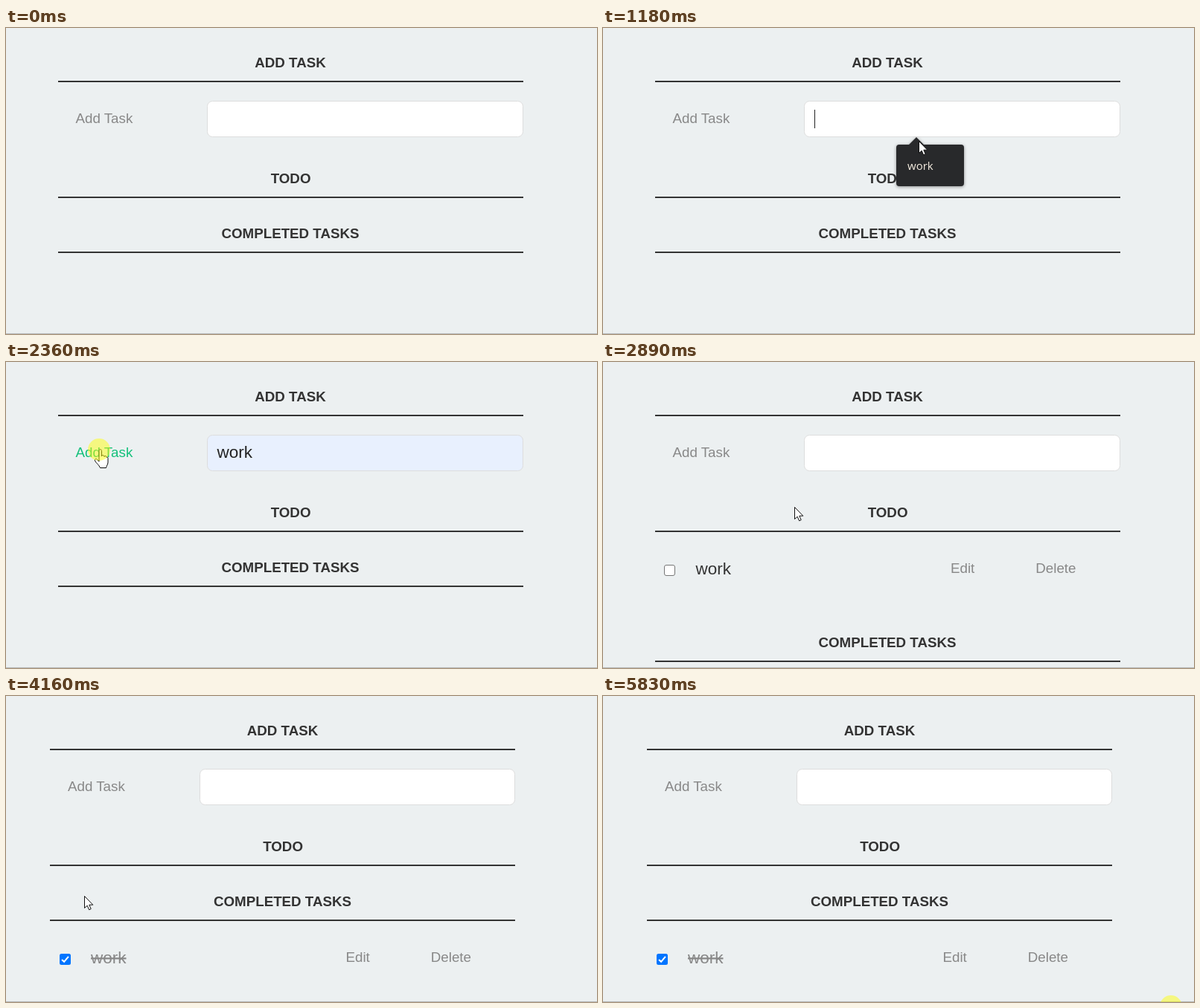
Animation, 794 px wide and 412 px high, one loop 5.9 s. Source, as an HTML page:

```html
<!DOCTYPE html>
<html lang="en">
<head>
<meta charset="utf-8">
<title>Todo list</title>
<style>
  html, body { margin: 0; width: 100%; height: 100%; overflow: hidden; background: #ecf0f1; }
  svg { display: block; width: 794px; height: 412px; font: 18.75px "Liberation Sans", Arial, sans-serif; }
  text { white-space: pre; }
  .heads { font-weight: 700; fill: #333; text-anchor: middle; }
  .rules { fill: #333; }
  .link { fill: #888; }
  .link.hover { fill: #12c07a; }
  .big { font-size: 22.5px; fill: #222; }
  #task .big { fill: #333; }
  #field { fill: #fff; stroke: #ddd; x: 270.5px; width: 424px; }
  #field.filled { fill: #e8f0fe; }
  #caret { fill: #222; }
  #popup { transform-origin: 439.5px 185px; fill: #28292b; filter: drop-shadow(0 1px 2px rgba(0, 0, 0, .4)); }
  #popup text { font: 15px "Open Sans", sans-serif; fill: #f4ecdf; }
  #row { fill: #414345; }
  #click { fill: #ff0; fill-opacity: .47; }
  .pointer { fill: #fff; stroke: #111; stroke-linejoin: round; }
  .hide { display: none; }

  /* The page moves left when its scrollbar appears. */
  .done .shift { transform: translateX(-10.5px); }
  .done .rules { transform: translateX(-11px); }
  .done #field { x: 260.5px; width: 423px; }
  .todo .lower { transform: translateY(101px); }
  .done #task { transform: translate(-10.5px, 74px); }
  .empty #task, .todo #checked { display: none; }
  .done #unchecked { display: none; }
  .done #task .big { fill: #888; text-decoration: line-through; }
</style>
</head>
<body>
<svg id="stage" class="empty" viewBox="0 0 794 412">
  <g class="rules">
    <rect x="70" y="71" width="625" height="2"/>
    <rect x="70" y="227" width="625" height="2"/>
    <rect class="lower" x="70" y="301" width="625" height="2"/>
  </g>
  <g class="shift heads">
    <text x="382" y="53">ADD TASK</text>
    <text x="382.6" y="209">TODO</text>
    <text class="lower" x="382" y="283">COMPLETED TASKS</text>
  </g>
  <text id="add" class="shift link" x="93.5" y="128">Add Task</text>
  <rect id="field" y="98.5" height="48" rx="7"/>
  <text id="value" class="big" x="283.5" y="129">work</text>
  <rect id="caret" y="110" width="1" height="25"/>

  <g id="task">
    <rect id="unchecked" x="82.5" y="273.5" width="14" height="14" rx="2.5" fill="#fff" stroke="#767676"/>
    <g id="checked">
      <rect x="82.5" y="273" width="15" height="15" rx="2.5" fill="#0075ff"/>
      <path d="M85.6 280.9l3 2.9 5.8-7" fill="none" stroke="#fff" stroke-width="2.1"/>
    </g>
    <text class="big" x="124.5" y="286">work</text>
    <text class="link" x="467" y="284">Edit</text>
    <text class="link" x="581.3" y="284">Delete</text>
  </g>

  <rect y="411" width="794" height="1" fill="#b8bbbc"/>

  <g id="popup">
    <path d="M398 157H411L421 147L431 157H481Q485 157 485 161V209Q485 213 481 213H398Q394 213 394 209V161Q394 157 398 157Z"/>
    <rect id="row" x="394" y="163" width="91" height="44"/>
    <text x="409" y="191">work</text>
  </g>

  <g id="mouse">
    <path id="arrow" class="pointer" d="M.5 .5V16.5L4.2 13.2L6.6 18.8L9.2 17.7L6.8 12.2H11.8Z"/>
    <path id="beam" d="M-3-8.5H-1Q0-8.5 0-7.5Q0-8.5 1-8.5H3M0-7.5V7.5M-3 8.5H-1Q0 8.5 0 7.5Q0 8.5 1 8.5H3" fill="none" stroke="#222"/>
    <path id="hand" class="pointer" d="M0 14V1.5C0-.8 3.5-.8 3.5 1.5V9C3.5 7 7 7 7 9.5C7.3 8 10 8 10.3 10.5C11 9.2 12 10 12 11.5V17C12 20 10 21.5 9.5 24.5H1.5C.5 21-4 18-5.5 15C-6 12.5-4 11.5-2.8 13L0 16Z"/>
    <circle id="click" r="15"/>
  </g>
</svg>
<script>
  const LOOP = 5900;
  const STEP = LOOP / 90;
  const LEAD = 16;
  const $ = id => document.getElementById(id);
  const show = (id, on) => $(id).classList.toggle('hide', !on);
  const within = (v, a, b) => v >= a && v < b;
  const smooth = k => k * k * (3 - 2 * k);

  // Pointer: where it enters, then each place it heads for.
  const entry = { x: 652, y: 371 };
  const moves = [
    { from: 200, to: 780, x: 424, y: 144 },   // task field
    { from: 910, to: 970, x: 424, y: 152 },
    { from: 1190, to: 1560, x: 408, y: 169 }, // suggestion
    { from: 1790, to: 2290, x: 125, y: 118 }, // add button
    { from: 2430, to: 2760, x: 268, y: 190 },
    { from: 2760, to: 3600, x: 87, y: 275 },  // checkbox
    { from: 3880, to: 4300, x: 115, y: 265 },
    { from: 4580, to: 4840, x: 118, y: 344 }, // finished task
    { from: 4860, to: 5170, x: 642, y: 369 },
    { from: 5170, to: 5630, x: 763, y: 418 }  // off the stage
  ];

  function locate(t) {
    let { x, y } = entry;
    for (const m of moves) {
      const k = smooth(Math.min(1, Math.max(0, (t - m.from) / (m.to - m.from))));
      x += (m.x - x) * k;
      y += (m.y - y) * k;
    }
    return [Math.round(x), Math.round(y)];
  }

  function draw(time) {
    const t = Math.floor((time + LEAD) / STEP) * STEP % LOOP;
    const [x, y] = locate(t);
    const filled = within(t, 1300, 2400);
    const fading = within(t, 1530, 1600);
    const popup = within(t, 915, 1600);
    const overAdd = within(x, 75, 190) && within(y, 100, 143);
    const overField = within(x, 270, 695) && within(y, 98, 147) && !popup;

    $('stage').setAttribute('class', t < 2400 ? 'empty' : t < 3860 ? 'todo' : 'done');
    $('add').classList.toggle('hover', overAdd);
    $('field').classList.toggle('filled', filled);
    show('value', filled);

    $('caret').setAttribute('x', filled ? 350 : 284);
    $('caret').setAttribute('y', filled ? 109 : 110);
    show('caret', within(t, 830, 1300) || within(t, 1490, 2000));

    show('popup', popup);
    show('row', filled);
    $('popup').style.opacity = fading ? .43 : t < 970 ? .6 : 1;
    $('popup').style.transform = fading ? 'scale(.978)' : 'none';

    show('mouse', t >= 255);
    $('mouse').setAttribute('transform', `translate(${x} ${y})`);
    show('click', within(t, 770, 915) || within(t, 2340, 2480) || within(t, 3730, 3860) || t >= 5820);
    show('hand', overAdd);
    show('beam', overField);
    show('arrow', !overAdd && !overField);
  }

  const origin = performance.now();
  function tick() {
    draw((performance.now() - origin) % LOOP);
    requestAnimationFrame(tick);
  }
  tick();
</script>
</body>
</html>
```
